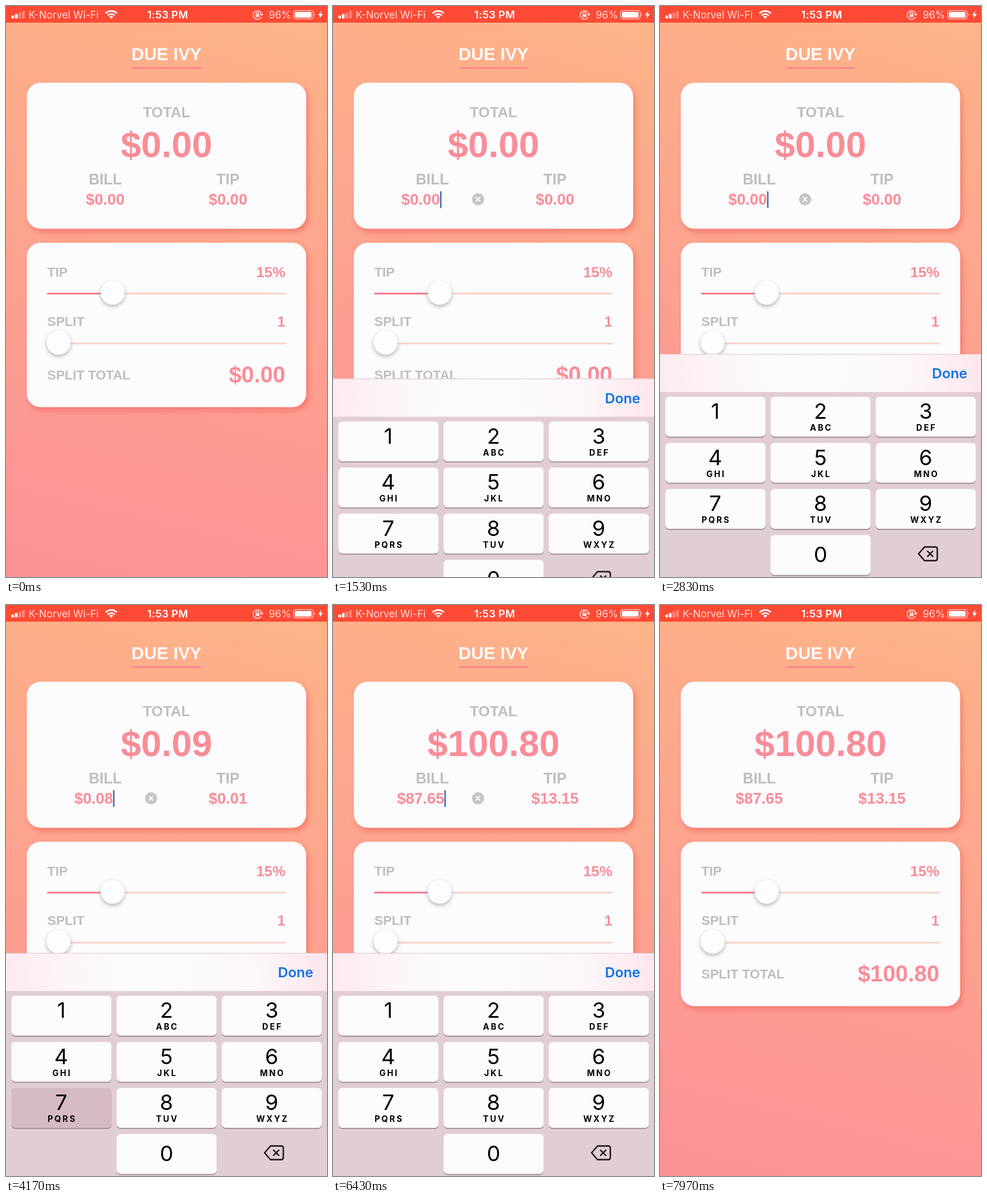
Recreate the animation shown at these times as an HTML page. Size 540x960 px, loop 8 s.

```html
<!DOCTYPE html>
<html lang="en">
<head>
<meta charset="utf-8">
<title>Tip calculator</title>
<style>
  html, body { margin: 0; width: 100%; height: 100%; overflow: hidden; background: #fda48f; }
  svg { display: block; width: 100%; height: 100%; }
  text { font-family: "Liberation Sans", Arial, sans-serif; font-weight: 700; }
  .ui, .ui text { font-family: Inter, Roboto, sans-serif; }
  .mid { text-anchor: middle; }
  .end { text-anchor: end; }
  .label { fill: #bfbebf; font-size: 22px; }
  .head { font-size: 25px; }
  .value { fill: #fa8d97; font-size: 26px; }
  .card { fill: #fcfbfd; filter: drop-shadow(4px 6px 4px rgba(236, 88, 84, .5)); }
  .track { fill: #fad3ca; }
  .thumb { fill: #fdfcfe; filter: drop-shadow(0 3px 3px rgba(120, 110, 115, .5)); }
  .status text { font-weight: 400; font-size: 17px; fill: #ffdcd6; }
  .status .clock { font-size: 17.5px; font-weight: 600; letter-spacing: .3px; fill: #fff; }
  .key { fill: #fcfbfd; }
  .key.down { fill: #d6bac2; }
  .digit { font-size: 36px; font-weight: 400; }
  .letters { font-size: 14px; font-weight: 700; letter-spacing: 2.6px; }
</style>
</head>
<body>
<svg viewBox="0 0 540 960" preserveAspectRatio="none">
  <defs>
    <linearGradient id="sky" gradientUnits="userSpaceOnUse" x1="390" y1="0" x2="155" y2="940">
      <stop offset="0" stop-color="#feb388"/>
      <stop offset=".5" stop-color="#fda38f"/>
      <stop offset="1" stop-color="#fd9296"/>
    </linearGradient>
    <linearGradient id="bar">
      <stop offset="0" stop-color="#fdeaf0"/>
      <stop offset=".2" stop-color="#fcf6f9"/>
      <stop offset=".4" stop-color="#fcfbfc"/>
      <stop offset=".78" stop-color="#fcf7fa"/>
      <stop offset="1" stop-color="#fde6ee"/>
    </linearGradient>
  </defs>

  <rect width="540" height="960" fill="url(#sky)"/>

  <g class="ui status">
    <rect width="540" height="28" fill="#ff4a35"/>
    <g fill="#fff">
      <rect x="9" y="16" width="4.5" height="5" rx="1"/>
      <rect x="15" y="13.5" width="4.5" height="7.5" rx="1"/>
      <rect x="21" y="11" width="4.5" height="10" rx="1" opacity=".35"/>
      <rect x="27" y="8.5" width="4.5" height="12.5" rx="1" opacity=".35"/>
    </g>
    <text x="38" y="21">K-Norvel Wi-Fi</text>
    <path d="M167.5 12.2a13.5 13.5 0 0 1 19 0M171 16a8.5 8.5 0 0 1 12 0" fill="none" stroke="#fff" stroke-width="2.7"/>
    <path d="M177 21.5l-3.4-3.5a4.8 4.8 0 0 1 6.8 0z" fill="#fff"/>
    <text x="272" y="21" class="clock mid">1:53 PM</text>
    <g fill="none" stroke="#ffdcd6" stroke-width="1.5">
      <path d="M429.4 18.5a7.2 7.2 0 1 1 .8-3.5M427.5 13.5l2.8 2.3 2.2-2.6"/>
      <path d="M421 14v-1.5a2 2 0 0 1 4 0V14"/>
    </g>
    <rect x="419.6" y="13.8" width="6.8" height="5" rx="1" fill="#ffdcd6"/>
    <text x="442" y="21">96%</text>
    <rect x="483.7" y="7.7" width="33" height="14" rx="3.5" fill="none" stroke="#ffd0c8" stroke-width="1.3"/>
    <rect x="486" y="10" width="28" height="9.4" rx="1.5" fill="#fff"/>
    <path d="M518.5 12.2q2.4 2.4 0 5z" fill="#ffd0c8"/>
    <path d="M530.5 8l-5.5 7.5h3.6l-1.4 5.5 6-7.5h-3.8z" fill="#fff"/>
  </g>

  <text x="270" y="91" class="mid" font-size="29.5" fill="#fffafa">DUE IVY</text>
  <rect x="212" y="103" width="116" height="2.5" fill="#fb8288"/>

  <rect class="card" x="35" y="129" width="470" height="245.5" rx="23"/>
  <text x="270" y="186.5" class="label mid" style="font-size:24.5px">TOTAL</text>
  <text x="270" y="254" class="value mid" style="font-size:61.5px" id="total"></text>
  <text x="167" y="299.5" class="label head mid">BILL</text>
  <text x="373.5" y="299.5" class="label head mid">TIP</text>
  <text y="334" class="value mid" id="bill"></text>
  <text x="373.5" y="334" class="value mid" id="tip"></text>
  <g id="editing">
    <rect id="caret" y="311.5" width="2.6" height="28" fill="#4a70c4"/>
    <circle cx="244" cy="325" r="10.2" fill="#c6c4c7"/>
    <path d="M240.3 321.3l7.4 7.4m0-7.4l-7.4 7.4" stroke="#fcfbfd" stroke-width="2"/>
  </g>

  <rect class="card" x="35" y="398" width="470" height="276.5" rx="23"/>
  <text x="69.5" y="454.5" class="label">TIP</text>
  <text x="470" y="455.5" class="value end" style="font-size:24.5px">15%</text>
  <rect class="track" x="69" y="482" width="402" height="3" rx="1.5"/>
  <rect x="69" y="482" width="100" height="3" rx="1.5" fill="#f77d90"/>
  <circle class="thumb" cx="179.5" cy="482" r="20.3"/>
  <text x="69.5" y="538" class="label">SPLIT</text>
  <text x="470" y="539" class="value end" style="font-size:24.5px">1</text>
  <rect class="track" x="69" y="566" width="402" height="3" rx="1.5"/>
  <circle class="thumb" cx="88.5" cy="566" r="20.3"/>
  <text x="69.5" y="628" class="label">SPLIT TOTAL</text>
  <text x="470" y="633" class="value end" style="font-size:38px" id="share"></text>

  <g id="keyboard" class="ui">
    <rect width="540" height="380" fill="#e1ced3"/>
    <rect width="540" height="64" fill="url(#bar)"/>
    <rect width="540" height="1" fill="#dcc8cc"/>
    <text x="517" y="41" class="end" font-size="23.5" style="font-weight:600" fill="#0f72e6">Done</text>
    <g id="keys"></g>
    <g fill="none" stroke="#1c1518" stroke-width="2.4" stroke-linejoin="round">
      <path d="M445 324.5h18q3.5 0 3.5 3.5v16q0 3.5-3.5 3.5h-18l-10-11.5z"/>
      <path d="M449.5 331l10 10m0-10l-10 10"/>
    </g>
  </g>
</svg>
<script>
  const LOOP = 8000, FOCUS = 1325, BLUR = 6462;
  const KEYBOARD_TOP = 585, KEYBOARD_HEIGHT = 375;
  const SPRING_RATE = Math.sqrt(1000 / 3) / 1000;
  const PRESSES = [
    { key: 8, down: 3690, up: 3800 },
    { key: 7, down: 4090, up: 4200 },
    { key: 6, down: 4440, up: 4550 },
    { key: 5, down: 4790, up: 4900 }
  ];
  const LETTERS = ["", "", "ABC", "DEF", "GHI", "JKL", "MNO", "PQRS", "TUV", "WXYZ"];
  const $ = id => document.getElementById(id);

  const keyMarkup = n => {
    const column = n ? (n - 1) % 3 : 1;
    const row = n ? Math.floor((n - 1) / 3) : 3;
    const x = 9 + column * 177, y = 72 + row * 77.5, center = x + 84;
    return `<rect x="${x}" y="${y + 1.5}" width="168.5" height="67.5" rx="6.5" fill="#a3959a"/>
      <rect class="key" id="key${n}" x="${x}" y="${y}" width="168.5" height="67" rx="6.5"/>
      <text class="digit mid" x="${center}" y="${y + (n ? 37 : 45)}">${n}</text>
      <text class="letters mid" x="${center + 1.3}" y="${y + 57}">${LETTERS[n]}</text>`;
  };
  $("keys").innerHTML = LETTERS.map((_, n) => keyMarkup(n)).join("");

  const money = cents => "$" + (cents / 100).toFixed(2);

  // Critically damped spring: what remains of the distance after `ms`.
  const remaining = ms => {
    const s = Math.max(0, ms) * SPRING_RATE;
    return (1 + s) * Math.exp(-s);
  };

  const setText = (id, value) => {
    if ($(id).textContent !== value) $(id).textContent = value;
  };

  function draw(t) {
    const typed = PRESSES.filter(p => t >= p.up);
    const bill = typed.reduce((sum, p) => sum * 10 + p.key, 0);
    const tip = Math.round(bill * 0.15);
    setText("bill", money(bill));
    setText("tip", money(tip));
    setText("total", money(bill + tip));
    setText("share", money(bill + tip));

    const editing = t >= FOCUS && t < BLUR;
    const center = editing ? 147.5 : 167;
    $("bill").setAttribute("x", center);
    $("editing").style.display = editing ? "" : "none";
    const lastInput = typed.length ? typed[typed.length - 1].up : FOCUS;
    const textWidth = money(bill).length > 5 ? 79.5 : 65;
    $("caret").setAttribute("x", center + textWidth / 2);
    $("caret").style.opacity = (t - lastInput) % 1000 < 650 ? 1 : 0;

    for (const p of PRESSES) $("key" + p.key).classList.toggle("down", t >= p.down && t < p.up);

    const hidden = t < BLUR ? remaining(t - FOCUS) : 1 - remaining(t - BLUR);
    const y = KEYBOARD_TOP + KEYBOARD_HEIGHT * hidden;
    $("keyboard").setAttribute("transform", `translate(0 ${y.toFixed(2)})`);
  }

  const start = performance.now();
  function frame() {
    draw((performance.now() - start) % LOOP);
    requestAnimationFrame(frame);
  }
  frame();
</script>
</body>
</html>
```
